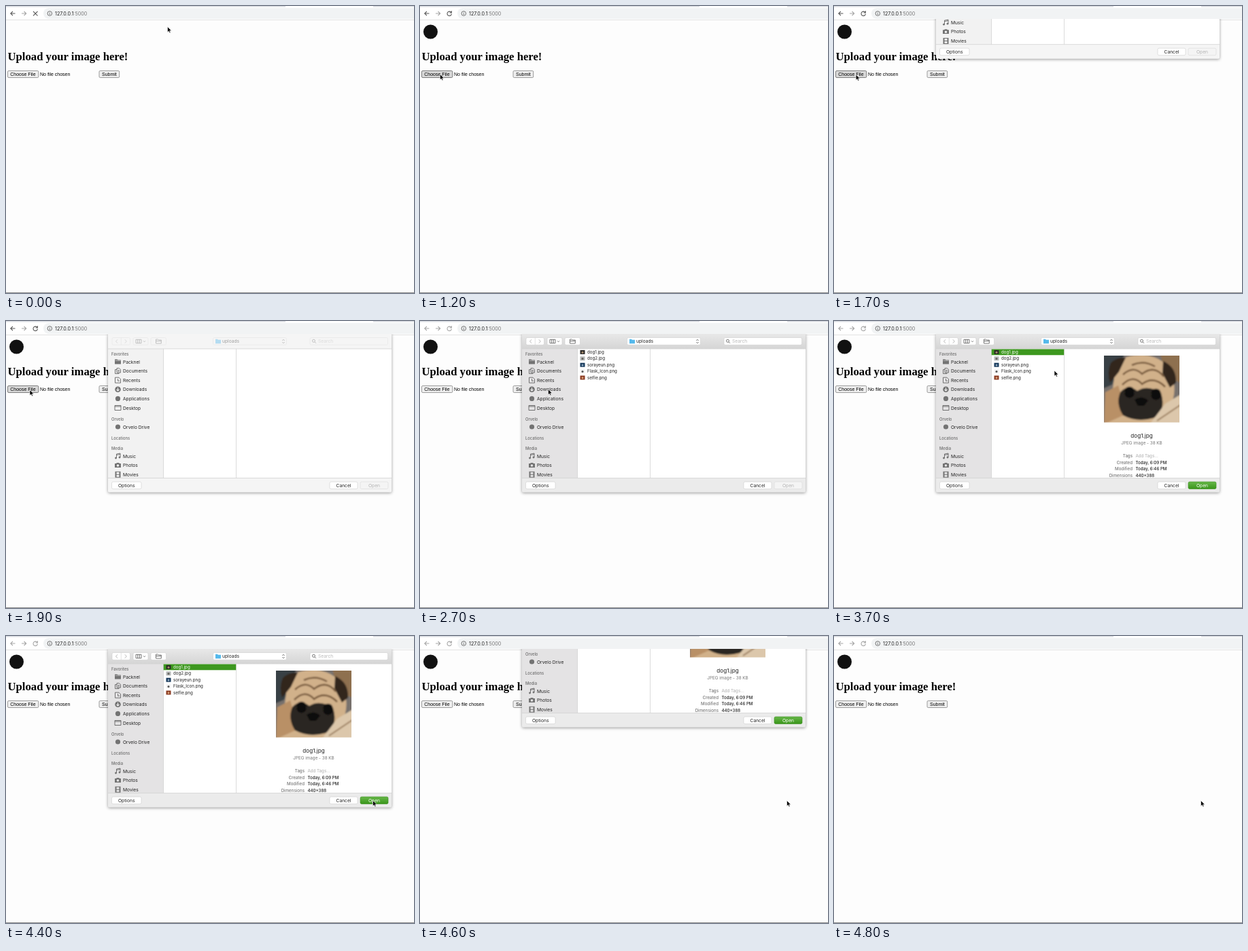
These frames come from a looping animation (600x423 px, 5000 ms). An HTML page:

```html
<!DOCTYPE html>
<html lang="en">
<head>
<meta charset="utf-8">
<title>Image upload</title>
<style>
  html, body { margin: 0; width: 100%; height: 100%; overflow: hidden; background: #fdfdfd; }
  svg { display: block; width: 600px; height: 423px; }
  text { font: 6.7px Inter, sans-serif; fill: #222; }
  .page { font: 7px "Liberation Sans", Arial, sans-serif; fill: #000; }
  .title { font: bold 16.7px "Liberation Serif", Times, serif; fill: #000; }
  .url { font-size: 7.2px; }
  .head { font-size: 5.8px; font-weight: 500; fill: #6c6c6c; }
  .file { font-size: 6.2px; }
  .meta { font-size: 6.15px; font-weight: 500; }
  .dim { fill: #777; }
  .pale { fill: #b8b8b8; }
  .mid { text-anchor: middle; }
  .end { text-anchor: end; }
  .line { fill: none; stroke: #555; stroke-width: 1.1; }
  .soft { stroke: #a5a5a5; }
  .thin { stroke-width: .8; }
  .input { fill: #efefef; stroke: #767676; stroke-width: .7; }
  .hover { fill: #d8d8d8; stroke: #4f4f4f; }
  .button { fill: #fff; stroke: #cfcfcf; stroke-width: .6; }
  .glyph { fill: #737373; }
  #sheet { filter: drop-shadow(0 1px 2px rgba(0, 0, 0, .4)); }
  .bar { fill: url(#barFill); }
  .side { fill: #e4e3e4; }
  .foot { fill: #ebebeb; }
  .idle .bar, .idle .foot { fill: #f5f5f5; }
  .idle .side { fill: #f2f2f2; }
  .idle #tools { opacity: .4; }
  .idle #tools .button { fill: #f5f5f5; }
  #open rect { fill: #f4f4f4; stroke: #dadada; stroke-width: .6; }
  #open text { fill: #b4b4b4; }
  .chosen #open rect { fill: url(#green); stroke: #3c8f20; }
  .chosen #open text, .chosen #files text:first-of-type { fill: #fff; }
  .preview { display: none; }
  .chosen .preview { display: inline; }
</style>
</head>
<body>
<svg viewBox="0 0 600 423">
  <defs>
    <linearGradient id="barFill" x2="0" y2="1"><stop stop-color="#e8e8e8"/><stop offset="1" stop-color="#d5d5d5"/></linearGradient>
    <linearGradient id="green" x2="0" y2="1"><stop stop-color="#68b84a"/><stop offset="1" stop-color="#389419"/></linearGradient>
    <clipPath id="below"><path d="M0 19H600V423H0Z"/></clipPath>
    <clipPath id="panes"><path d="M150 41H567V231H150Z"/></clipPath>
    <clipPath id="photo"><path d="M397 51H508V149.500H397Z"/></clipPath>
    <filter id="blur"><feGaussianBlur stdDeviation="1.1"/></filter>
  </defs>

  <!-- Browser -->
  <path fill="#fff" d="M0 0H600V20H0Z"/>
  <path fill="#d9dce1" d="M0 0H411V1.500H0ZM540 0H600V1.500H540Z"/>
  <rect x="55" y="3" width="570" height="16" rx="8" fill="#f1f3f4"/>
  <path stroke="#dcdcdc" stroke-width=".8" d="M0 20.500H600"/>
  <path stroke="#8d8d8d" d="M0 422.500H600"/>
  <path id="back" class="line" d="M13.500 11H7M10 7.800L6.800 11L10 14.200"/>
  <path class="line soft" d="M23 11H29.500M26.500 7.800L29.700 11L26.500 14.200"/>
  <path id="stop" class="line" d="M40 7.800L46.500 14.300M46.500 7.800L40 14.300"/>
  <g id="reload"><path class="line" d="M45.600 9.200A3.200 3.200 0 1 0 46.400 11.600M46.400 7.300V10H43.700"/></g>
  <circle class="line thin" cx="64.300" cy="11" r="3.300"/>
  <path class="line thin" d="M64.300 10.500V13M64.300 8.800V9.600"/>
  <text class="url" x="72" y="13.600">127.0.0.1<tspan class="dim">:5000</tspan></text>

  <!-- Page -->
  <circle id="logo" cx="15.500" cy="38" r="10.500" fill="#111"/>
  <text class="title" x="2.500" y="79.500">Upload your image here!</text>
  <rect id="choose" class="input" x="2.500" y="95.500" width="45.300" height="10" rx="1.500"/>
  <text class="page" x="6.200" y="103">Choose File</text>
  <text class="page" x="50" y="103">No file chosen</text>
  <rect class="input" x="137" y="95.500" width="29.700" height="10" rx="1.500"/>
  <text class="page" x="141" y="103">Submit</text>

  <!-- File dialog -->
  <g clip-path="url(#below)">
    <g id="sheet">
      <path class="bar" d="M150 19H567V41H150Z"/>
      <path fill="#fff" d="M231 41H567V232H231Z"/>
      <path class="side" d="M150 41H231.500V232H150Z"/>
      <path class="foot" d="M150 231.500H567V250.500Q567 252.500 565 252.500H152Q150 252.500 150 250.500Z"/>
      <path class="line thin" style="stroke:#d2d2d2" d="M150 41H567M231.500 41V231.500M338.500 41V231.500M150 231.500H567"/>
      <g id="tools">
        <rect class="button" x="156" y="24.500" width="26.500" height="10.800" rx="2"/>
        <path class="button" d="M169.300 24.500V35.300"/>
        <path class="line soft thin" d="M164 27.300L161.500 30L164 32.700M174.800 27.300L177.300 30L174.800 32.700"/>
        <rect class="button" x="187" y="24.500" width="22" height="10.800" rx="2"/>
        <path class="line thin" d="M191 27.300H199V32.700H191ZM193.700 27.300V32.700M196.300 27.300V32.700M202 29.300L203.500 30.800L205 29.300"/>
        <rect class="button" x="213" y="24.500" width="22.500" height="10.800" rx="2"/>
        <path class="line thin" d="M220.500 27H223.500L224.500 28H228.300V33H220.500ZM220.500 29.500H228.300"/>
        <rect class="button" x="304.500" y="24.500" width="108" height="10.800" rx="2"/>
        <path fill="#55b9ec" d="M308 26.800H311L312 27.800H316V33.300H308Z"/>
        <text x="318" y="32.400">uploads</text>
        <path class="line thin" d="M406.300 29L408 27.200L409.700 29M406.300 31L408 32.800L409.700 31"/>
        <rect class="button" x="447" y="24.500" width="114.500" height="10.800" rx="2"/>
        <circle class="line thin" cx="452.500" cy="29.300" r="2"/>
        <path class="line thin" d="M454 30.800L456 32.800"/>
        <text class="pale" x="459" y="32.400">Search</text>
      </g>
      <g clip-path="url(#panes)">
        <g id="places"></g>
        <path class="preview" fill="#3d981f" d="M231.700 41.400H338.200V50.200H231.700Z"/>
        <g id="files"></g>
        <g class="preview">
          <g clip-path="url(#photo)"><g filter="url(#blur)">
            <path fill="#77716d" d="M390 45H515V155H390Z"/>
            <path fill="#394045" d="M395 49H427L409 94L395 100Z"/>
            <path fill="#8e7050" d="M480 49H512V92L488 82Z"/>
            <path fill="#d1b18a" d="M414 63Q426 50 455 50Q489 53 497 82Q507 106 489 139L465 152H399Q410 115 414 63Z"/>
            <path fill="#b99066" d="M399 105L418 95L430 137L397 152Z"/>
            <path fill="#32271f" d="M407 62Q415 53 429 54L419 75L406 91Q401 76 407 62ZM484 59Q504 68 503 91L494 98L483 77Z"/>
            <path fill="#2a2522" d="M421 105Q432 92 446 103Q461 93 481 106Q489 134 470 143Q445 150 425 139Q414 122 421 105Z"/>
            <path fill="#0f0e0e" d="M428 105a7 6 0 1 0 13 0a7 6 0 1 0-13 0M467 108a7 6 0 1 0 13 0a7 6 0 1 0-13 0M442 116Q452 109 462 117L456 125H447Z"/>
            <path fill="none" stroke="#76583b" stroke-width="2.500" d="M425 79Q440 65 453 78Q471 64 485 82M424 94Q440 78 453 93Q470 80 487 97M438 65Q455 57 472 67"/>
            <path fill="#dcc7ab" d="M487 122L512 107V155H462Z"/>
            <path fill="none" stroke="#97795a" stroke-width="2" d="M475 147L509 124"/>
          </g></g>
          <text class="mid" style="font-size:8.100px" x="452.500" y="172">dog1.jpg</text>
          <text class="mid dim" style="font-size:6.300px" x="452.500" y="182.300">JPEG image - 38 KB</text>
          <g id="details"></g>
        </g>
      </g>
      <rect class="button" x="155.500" y="237" width="43.500" height="10.500" rx="2"/>
      <text class="mid" x="177.200" y="244.700">Options</text>
      <rect class="button" x="476" y="237" width="41" height="10.500" rx="2"/>
      <text class="mid" x="496.500" y="244.700">Cancel</text>
      <g id="open">
        <rect x="521" y="237" width="41" height="10.500" rx="2"/>
        <text class="mid" x="541.500" y="244.700">Open</text>
      </g>
    </g>
  </g>
  <path id="cursor" stroke="#fff" stroke-width=".6" d="M0 0V8.200L1.900 6.500L3.100 9.300L4.500 8.700L3.300 5.900H5.800Z"/>
</svg>
<script>
const $ = id => document.getElementById(id);
const label = (x, y, text, type = '') => `<text class="${type}" x="${x}" y="${y}">${text}</text>`;

// Sidebar glyphs, centred on 0,0
const outline = d => `<path class="line thin" d="${d}"/>`;
const solid = d => `<path class="glyph" fill-rule="evenodd" d="${d}"/>`;
const dot = '<circle class="glyph" r="3.6"/>';
const icons = {
  folder: solid('M-4.500-3.500H-1L0-2.500H4.500V3.500H-4.500ZM-4-1.500V-1H4V-1.500Z'),
  pages: outline('M-1.500-4H2L4-2V2.500H-1.500ZM-1.500-2H-4V4H1.500V2.500M0-1H2.500M0 .6H2.500'),
  clock: outline('M-4-4H1.500L4-1.500V4H-4ZM0-2V1H2.500'),
  down: '<circle class="glyph" r="4.300"/><path class="line" style="stroke:#eee" d="M0-2.500V2M-2 .2L0 2.200L2 .2"/>',
  desk: outline('M-4.500-3.500H4.500V3.500H-4.500ZM-4.500-2H4.500'),
  note: outline('M-2 3V-3L3.500-4V2M-2-1.500L3.500-2.500') + '<circle class="glyph" cx="-3" cy="3" r="1.400"/><circle class="glyph" cx="2.500" cy="2" r="1.400"/>',
  camera: solid('M-4.500-2.500H-2.500L-1.500-3.500H1.500L2.500-2.500H4.500V3.300H-4.500ZM-1.800 .4a1.800 1.800 0 1 0 3.600 0a1.800 1.800 0 1 0-3.600 0'),
  film: solid('M-4-4.500H4V4.500H-4ZM-2-3.500V-.5H2V-3.500ZM-2 .5V3.500H2V.5Z'),
  dot
};
const places = [
  [48.5, 'Favorites'], [60, 'Packnel', 'folder'], [73.6, 'Documents', 'pages'], [87.2, 'Recents', 'clock'],
  [100.8, 'Downloads', 'down'], [114.4, 'Applications', 'dot'], [128, 'Desktop', 'desk'],
  [144.5, 'Orvelo'], [156, 'Orvelo Drive', 'dot'], [173, 'Locations'],
  [187.5, 'Media'], [199, 'Music', 'note'], [212.6, 'Photos', 'camera'], [226.2, 'Movies', 'film']
];
$('places').innerHTML = places.map(([y, name, icon]) => icon
  ? `<g transform="translate(164.500 ${y})">${icons[icon]}</g>` + label(172, y + 2.5, name)
  : label(155, y + 2.2, name, 'head')).join('');

// Each thumbnail is a ground colour and a smaller shape colour
const files = [
  ['dog1.jpg', '#2c2a28', '#a58b6c'], ['dog2.jpg', '#b5b8b8', '#65625d'], ['sorayeun.png', '#173a5c', '#8ea7bd'],
  ['Flask_Icon.png', '#f3f3f3', '#555'], ['selfie.png', '#8b3b22', '#d7a078']
];
$('files').innerHTML = files.map(([name, ground, shape], i) => {
  const y = 45.9 + i * 9.4;
  return `<rect x="235.500" y="${y - 3}" width="7" height="6" fill="${ground}"/>
    <circle cx="239" cy="${y + .3}" r="1.500" fill="${shape}"/>` + label(246, y + 2.1, name, 'file');
}).join('');

const details = [['Tags', 'Add Tags…'], ['Created', 'Today, 6:09 PM'], ['Modified', 'Today, 6:46 PM'], ['Dimensions', '440×388']];
$('details').innerHTML = details.map(([name, value], i) => {
  const y = 201.4 + i * 9.4;
  return label(439, y, name, 'meta end dim') + label(443.5, y, value, i ? 'meta' : 'meta pale');
}).join('');

// Pointer stops: tick (100 ms), x, y
const path = [
  [0, 237.5, 30.5], [4, 237.5, 30.5], [6, 101.5, 100.5], [7, 101.5, 100.5], [9, 64, 102], [12, 29.5, 100.5],
  [15, 29.5, 100.5], [19, 35, 101.5], [21, 35, 101.5], [24, 85, 143], [27, 188.5, 100.5], [30, 265, 62],
  [33, 310, 28], [34, 310, 28], [35, 312, 34], [36, 315, 46], [37, 324, 73], [40, 490, 215],
  [43, 538, 242], [44, 539.5, 242.5], [50, 539.5, 242.5]
];
const pointerAt = tick => {
  const i = path.findIndex(stop => stop[0] > tick);
  const [t0, x0, y0] = path[i - 1], [t1, x1, y1] = path[i];
  const k = (tick - t0) / (t1 - t0);
  return [x0 + (x1 - x0) * k, y0 + (y1 - y0) * k];
};
const ease = k => { k = Math.min(1, Math.max(0, k)); return k * k * (3 - 2 * k); };
const show = (id, on) => $(id).style.display = on ? '' : 'none';

function draw() {
  const tick = Math.floor(performance.now() % 5000 / 100);
  const [x, y] = pointerAt(tick);
  const opened = ease((tick - 16) / 3) * (1 - ease((tick - 44) / 4));
  const inactive = tick >= 20;
  $('cursor').setAttribute('transform', `translate(${x} ${y})`);
  show('stop', tick < 1);
  show('reload', tick >= 1);
  show('logo', tick >= 1);
  $('back').classList.toggle('soft', inactive);
  $('reload').firstChild.classList.toggle('soft', inactive);
  $('choose').classList.toggle('hover', tick >= 10 && tick < 22);
  show('sheet', opened > 0);
  show('files', inactive);
  $('sheet').setAttribute('transform', `translate(0 ${(opened - 1) * 236})`);
  $('sheet').setAttribute('class', !inactive ? 'idle' : tick >= 36 ? 'chosen' : '');
  requestAnimationFrame(draw);
}
draw();
</script>
</body>
</html>
```
